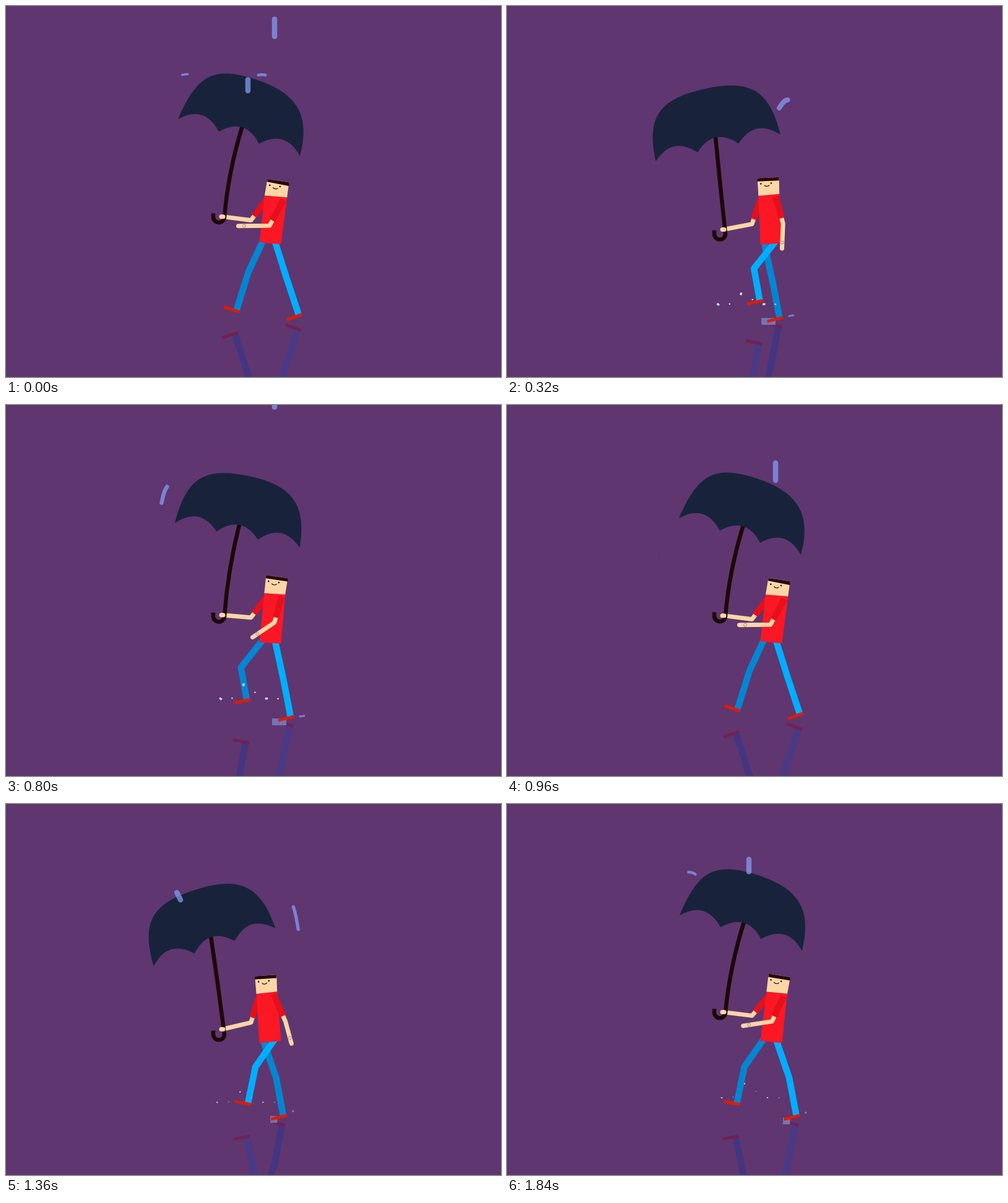
Write an HTML page with a canvas that moves like this. It is 800 px wide and 600 px high and loops after 1.88 s.

```html
<!DOCTYPE html>
<html lang="en">
<head>
<meta charset="utf-8">
<title>Walk in the rain</title>
<style>
html, body { margin: 0; width: 100%; height: 100%; overflow: hidden; background: #5f3670; }
canvas { display: block; width: 800px; height: 600px; }
</style>
</head>
<body>
<canvas id="stage" width="800" height="600"></canvas>
<script>
const c = document.getElementById('stage').getContext('2d');
const LOOP = 1880, STEP = 40, STRIDE = 960, HALF = STRIDE / 2;

const BG = '#5f3670', CANOPY = '#18233b', WOOD = '#1d0708', SKIN = '#fcd6a6', HAIR = '#260608',
  SHIRT = '#fb1724', SLEEVE = '#e60f1b', SHOE = '#e01b06', PUDDLE = '#7276b4',
  STREAK = '#7c7fd0', SPRAY = '#cfe8fb', RAIN = 'rgba(136,162,250,.7)';

// Sum of harmonics of the stride; each term is [amplitude, time of its peak]
function series(p, mean, ...terms) {
  return terms.reduce((sum, [amp, peak], k) =>
    sum + amp * Math.cos((k + 1) * 2 * Math.PI * (p - peak) / STRIDE), mean);
}

function line(color, width, points, cap = 'butt') {
  c.strokeStyle = color;
  c.lineWidth = width;
  c.lineCap = cap;
  c.lineJoin = 'round';
  c.beginPath();
  points.forEach(([x, y]) => c.lineTo(x, y));
  c.stroke();
}

function shape(color, points) {
  c.fillStyle = color;
  c.beginPath();
  points.forEach(([x, y]) => c.lineTo(x, y));
  c.fill();
}

function dot(color, x, y, r) {
  c.fillStyle = color;
  c.beginPath();
  c.arc(x, y, r, 0, 7);
  c.fill();
}

function at(x, y, angle, draw) {
  c.save();
  c.translate(x, y);
  c.rotate(angle);
  draw();
  c.restore();
}

// Both legs make the same step, half a stride apart
function leg(p, x, color, shoe) {
  const knee = [x + series(p, 426.7, [26.7, -100], [5.7, 0]), series(p, 436.2, [10, -160], [2.4, 143])];
  const ankle = [x + series(p, 437.3, [43, -7], [8, 169], [2.5, 160]), series(p, 490.7, [18, 730], [3.7, 0], [2.4, 0])];
  const tilt = series(p, -12.7, [28.3, 574], [13, -36], [4, 0]);
  line(color, 10.5, [[x + 434.5, 380], knee, [ankle[0], ankle[1] + 1]]);
  at(...ankle, tilt * Math.PI / 180, () => {
    c.fillStyle = shoe;
    c.fillRect(-21, 0, 26.5, 4.8);
  });
}

function legs(p, near, far, shoe) {
  leg((p + HALF) % STRIDE, -19.5, far, shoe);
  leg(p, 0, near, shoe);
}

function reflection(p) {
  c.save();
  c.translate(-2, 1023);
  c.scale(1, -1);
  legs(p, '#483a86', '#443582', '#742050');
  c.restore();
}

function puddle(p, x) {
  if (p < 80) return;
  const width = 46 * (HALF - p) / 320 * Math.min(1, (p - 70) / 60);
  const right = x + 458 - 27 * ((440 - p) / 280) ** 2;
  c.fillStyle = PUDDLE;
  c.fillRect(right - width, 507 + x / 8, width, 11);
}

function splash(p, x) {
  if (p < 80) return;
  const burst = 1 - Math.max(0, 1 - (p - 80) / 240) ** 2.5;
  const fade = Math.min(1, (HALF - p) / 260);
  for (let i = 0; i < 6; i++) {
    const dx = 18.5 * i - 45, dy = -30 - 27 * Math.exp(-2 * (i - 2.3) ** 2);
    const size = (i % 2 ? 4 : 7) * fade;
    at(392 + x * .3 + dx * burst, 505 + dy * burst * (1 + x / 76), i * .6 + p / 460, () => {
      c.fillStyle = SPRAY;
      c.fillRect(-size / 2, -size * .35, size, size * .75);
    });
  }
  // streak skidding away behind the foot
  const length = 17 * (1 - (p / 420) ** 3);
  if (length < 0) return;
  const tip = x + 398 + 86 * (1 - Math.max(0, 1 - (p - 80) / 320) ** 3.3);
  const y = 511 + x / 8 - Math.max(0, p - 160) * .05;
  line(STREAK, 3, [[tip - length, y + 1], [tip, y - .5]]);
}

function umbrella(p, hand) {
  const tilt = series(p, -.5, [17.7, -30]), a = tilt * Math.PI / 180;
  const x = series(p, 357.5, [20.5, -60]), y = series(p, 223.5, [11.5, 416], [3.7, 122]);
  const hook = series(p, 358.5, [18, 430], [4, 125]);

  const topX = x + 22 * Math.sin(a), topY = y - 22 * Math.cos(a);
  c.strokeStyle = WOOD;
  c.lineWidth = 6.5;
  c.lineCap = 'butt';
  c.beginPath();
  c.moveTo(topX, topY);
  c.quadraticCurveTo((topX + 353) / 2 - (tilt + 14) / 3.6, (topY + hook) / 2, 353, hook);
  c.arc(344, hook, 9, 0, Math.PI);
  c.lineTo(335, hook - 6);
  c.stroke();
  line(SKIN, 7, [[348, hand], [351, hand]], 'round');

  // the wind flattens the left side when the canopy leans right
  const lean = ((tilt + 6) / 23) ** 2;
  at(x, y, a, () => {
    c.fillStyle = CANOPY;
    c.beginPath();
    c.moveTo(-103, 0);
    c.bezierCurveTo(10 * lean - 104, -75, -75, -98, 2 - 10 * lean, -98);
    c.bezierCurveTo(77 - 12 * lean, -98, 101, -72, 103, 0);
    for (const rim of [34, -34, -103]) c.quadraticCurveTo(rim + 34, -35, rim, 0);
    c.fill();
  });
}

// Four-sided top edge: middle, width and slope give its two ends
function edge(x, y, width, slope) {
  return [[x - width / 2, y - slope / 2], [x + width / 2, y + slope / 2]];
}

function head([left, right], neck, bob) {
  shape(SKIN, [left, right, neck[1], neck[0]]);
  shape(HAIR, [left, right, [right[0], right[1] + 6.2 + bob], [left[0] - .4, left[1] + 4.3 - .9 * bob]]);
  at(...left, Math.atan2(right[1] - left[1], right[0] - left[0]), () => {
    dot(HAIR, 5.3, 9.2, 1.3);
    dot(HAIR, 22, 8.9, 1.3);
    c.strokeStyle = HAIR;
    c.lineWidth = 1.2;
    c.beginPath();
    c.moveTo(10.5, 12);
    c.quadraticCurveTo(14.5, 15.5, 19, 12);
    c.stroke();
  });
}

function arm(shoulder, elbow, hand) {
  const cuff = shoulder.map((v, i) => v + (elbow[i] - v) * .8);
  line(SKIN, 7, [cuff, elbow, hand], 'round');
  line(SLEEVE, 10, [shoulder, cuff]);
}

function watch([ex, ey], [hx, hy]) {
  const k = 9.5 / Math.hypot(ex - hx, ey - hy);
  c.strokeStyle = '#9a86b4';
  c.lineWidth = 1;
  c.beginPath();
  c.arc(hx + (ex - hx) * k, hy + (ey - hy) * k, 2.5, 0, 7);
  c.stroke();
}

function walker(p) {
  const step = p % HALF, side = p < HALF ? -19 : 0;
  const bob = series(p, 0, [0, 0], [1, 125]), sway = series(p, 0, [1, -45]);
  const top = edge(series(p, 430, [10.5, -50]), 283 + 6.3 * bob, 35, series(p, 1.6, [4, -70]));
  const chest = edge(428.8 + 7.6 * sway, 308.3 + 3.5 * bob, 36.5 + 3.2 * bob, 3.6 * sway - .4);
  const hem = edge(427, 383.7 - 1.2 * bob, 35, 3.6 * sway);
  const [[lx, ly], [rx, ry]] = chest;
  const grip = [350, series(p, 354, [14, 425], [4, 125])];
  const elbow = [series(p, 440, [14, 490]), 355.5 + 4.3 * bob];
  const hand = [series(p, 421.5, [46, 480]), series(p, 383, [16.5, 480], [12, 205])];

  reflection(p);
  puddle(step, side);
  legs(p, '#00aeff', '#0286d2', SHOE);
  arm([lx + 3, ly + 7], [396, series(p, 351.7, [5.5, 415], [4.3, 125])], grip);
  shape(SHIRT, [...chest, hem[1], hem[0]]);
  head(top, chest, bob);
  arm([rx - 6, ry + 4], elbow, hand);
  watch(elbow, hand);
  umbrella(p, grip[1]);
  splash(step, side);
}

// Drops fall down a lane, land on the umbrella, then hop off sideways
const LANES = [
  { x: 282, starts: [382, 1076], speed: .68, length: 36, land: 155, wait: 260, air: 320, hop: -41, rise: 27, fall: 100, width: 8.5 },
  { x: 318, starts: [1420], speed: .55, length: 32, land: 128, wait: 255, air: 470, hop: -43, rise: 17, fall: -20, width: 5 },
  { x: 391, starts: [1533], speed: .37, length: 28, land: 121, wait: 309, air: 200, hop: 45, rise: 10, fall: 0, width: 5.5 },
  { x: 434, starts: [790, 1848], speed: .74, length: 36, land: 175, wait: 270, air: 490, hop: 45, rise: 25, fall: 88, width: 8.5 }];

function drop(lane, age) {
  const { x, speed, length, land, wait, air, hop, rise, fall, width } = lane;
  const tip = age * speed, top = tip - length;
  if (tip > 0 && top < land)
    line(RAIN, 8.5, [[x, top + 4], [x, Math.max(top + 5, Math.min(tip, land + 20) - 4)]], 'round');

  const s = (age - wait) / air;
  if (s <= 0 || s >= 1) return;
  const ease = v => 1 - (1 - v) ** 2;
  const from = ease(Math.max(0, s - .18)), to = ease(s), points = [];
  for (let i = 0; i <= 12; i++) {
    const u = from + (to - from) * i / 12;
    points.push([x + hop * u, land + fall * u ** 5 - rise * Math.sin(Math.PI * u)]);
  }
  line(RAIN, width * (1 - s * s), points, 'round');
}

function rain(t) {
  for (const lane of LANES)
    for (const start of lane.starts) drop(lane, t - start);
}

const begin = performance.now();

function frame() {
  const t = Math.floor((performance.now() - begin) % LOOP / STEP) * STEP;
  c.fillStyle = BG;
  c.fillRect(0, 0, 800, 600);
  walker(t % STRIDE);
  rain(t);
  rain(t + 2 * STRIDE); // drops still in the air when the loop restarts
  requestAnimationFrame(frame);
}

frame();
</script>
</body>
</html>
```
